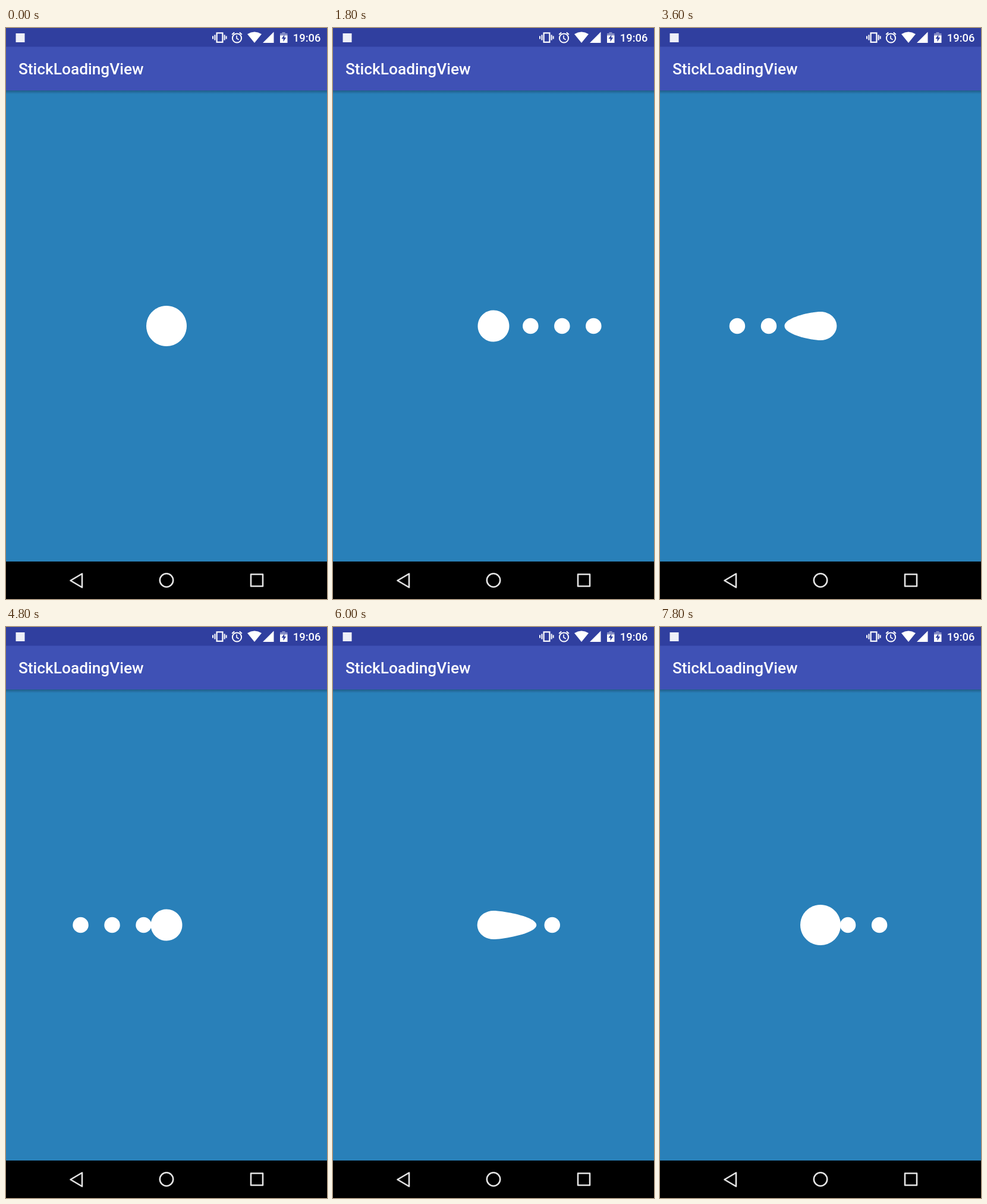
Recreate the animation shown at these times as an HTML page. Size 540 by 960 pixels, loop 8000 ms.

```html
<!DOCTYPE html>
<html lang="en">
<head>
<meta charset="utf-8">
<title>StickLoadingView</title>
<style>
  html, body { margin: 0; width: 100%; height: 100%; overflow: hidden; background: #2980b9; }
  svg { display: block; width: 100vw; height: 100vh; }
  text { font-family: Roboto, sans-serif; font-weight: 500; fill: #fff; }
</style>
</head>
<body>
<svg viewBox="0 0 540 960">
  <defs>
    <linearGradient id="shade" x2="0" y2="1">
      <stop offset="0" stop-color="#123" stop-opacity=".36"/>
      <stop offset="1" stop-color="#123" stop-opacity="0"/>
    </linearGradient>
  </defs>
  <rect width="540" height="960" fill="#2980b9"/>
  <rect y="105" width="540" height="6" fill="url(#shade)"/>
  <rect y="31" width="540" height="74" fill="#3f51b5"/>
  <rect width="540" height="31.5" fill="#303f9f"/>
  <text x="21" y="78" font-size="26.25">StickLoadingView</text>

  <!-- status bar -->
  <rect x="16.5" y="9" width="15" height="15" fill="#eef0f8"/>
  <g fill="none" stroke="#fff" stroke-width="2">
    <rect x="354.6" y="8.4" width="9.8" height="15.4" stroke-width="2.2"/>
    <path d="M351.4 11.5v9M348 13.5v5M367.6 11.5v9M370.6 13.5v5"/>
    <circle cx="388.5" cy="17" r="7.6"/>
    <path d="M388 12.5v5l3.6 2.2" stroke-width="1.6"/>
    <path d="M380.2 11l4-3.6M396.8 11l-4-3.6"/>
  </g>
  <g fill="#fff">
    <path d="M418 25L406 10.2Q418 2.8 430 10.2Z"/>
    <path d="M450.5 6.5V25H432Z"/>
    <path d="M461 9h3.5V7h5v2h4v4h-12.500z" opacity=".4"/>
    <path d="M461 12.500h12.500V25H461z"/>
  </g>
  <path d="M468.300 11.500l-4.800 6.400h3v5l4.800-7h-3z" fill="#303f9f"/>
  <text x="529.500" y="23" font-size="18.400" text-anchor="end">19:06</text>

  <!-- navigation bar -->
  <rect y="897" width="540" height="63"/>
  <g fill="none" stroke="#e4e4e4" stroke-width="2.600" stroke-linejoin="round">
    <path d="M108.500 929L128 917.500V940.500Z"/>
    <circle cx="270" cy="928.500" r="11.200"/>
    <rect x="412" y="918.500" width="20" height="20"/>
  </g>

  <g id="loader" fill="#fff">
    <path id="body"/>
    <circle class="dot" r="13.250"/>
    <circle class="dot" r="13.250"/>
    <circle class="dot" r="13.250"/>
  </g>
</svg>
<script>
const LOOP = 8000, STEP = 200;
const PEAKS = [1500, 4219, 6901];  // moments of farthest reach: right, left, right
const HALF = 1355, REACH = 177, GAP = 53;
const BIG = 34, SMALL = 26.5, MERGE = 24;

const loader = document.getElementById('loader');
const body = document.getElementById('body');
const dots = [...document.querySelectorAll('.dot')];
const clamp = v => Math.max(0, Math.min(1, v));

// Circle of radius r whose leading point is pulled out by pull.
function drop(r, pull) {
  const k = clamp(pull / 12), c = 0.5523;
  const h = r * (1 - 0.09 * k), back = r * (1 + 0.03 * k), tip = r + pull;
  const half = y => `C${r * c} ${y * h} ${tip} ${y * r * c} ${tip} 0`;
  return `M0 ${-h}${half(-1)}` +
    `C${tip} ${r * c} ${r * c} ${h} 0 ${h}` +
    `C${-back * c} ${h} ${-back} ${h * c} ${-back} 0` +
    `C${-back} ${-h * c} ${-back * c} ${-h} 0 ${-h}Z`;
}

function draw(t) {
  const near = PEAKS.reduce((a, b) => Math.abs(b - t) < Math.abs(a - t) ? b : a);
  const dir = PEAKS.indexOf(near) % 2 ? -1 : 1;
  const leaving = t < near;
  const reach = Math.max(0, REACH * (1 - ((t - near) / HALF) ** 2));
  const lastDot = reach - 2 * GAP;
  const size = leaving ? 1 - clamp(reach / GAP) : clamp((34 - lastDot) / 34);
  const limit = leaving ? GAP : MERGE;
  let pull = 0;

  dots.forEach((dot, i) => {
    const d = reach - i * GAP;
    if (d > 0 && d < limit) pull = d;
    dot.setAttribute('cx', d);
    dot.setAttribute('visibility', d >= limit ? 'visible' : 'hidden');
  });
  body.setAttribute('d', drop(SMALL + (BIG - SMALL) * size, pull));
  loader.setAttribute('transform', `translate(270 501) scale(${dir} 1)`);
}

const start = performance.now();
function tick() {
  const t = (performance.now() - start) % LOOP;
  draw(Math.floor(t / STEP) * STEP);
  requestAnimationFrame(tick);
}
tick();
</script>
</body>
</html>
```
